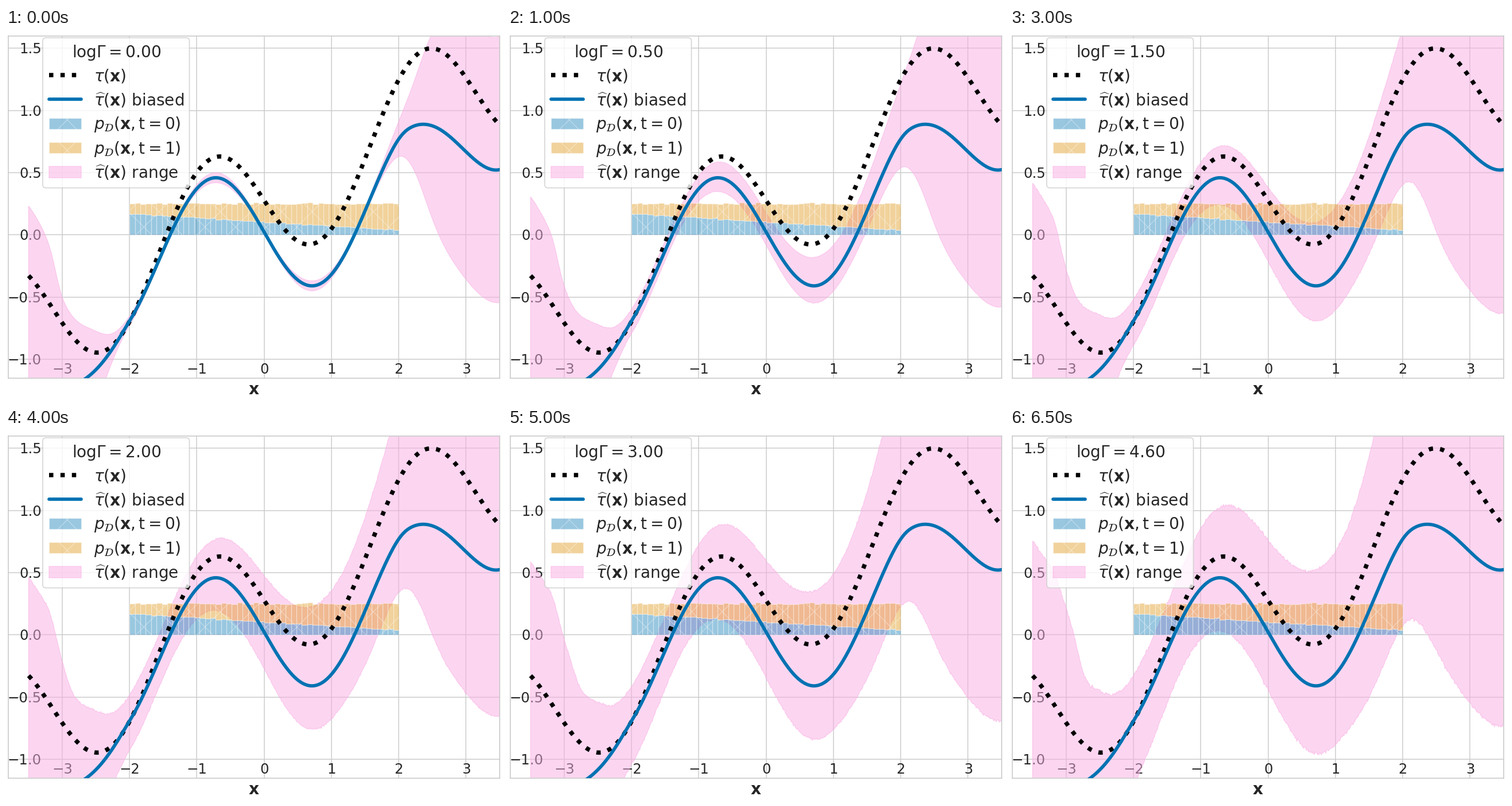
These frames come from a looping animation (864 by 648 pixels, 7000 ms). A matplotlib script:

```python
import numpy as np
import matplotlib.pyplot as plt
from matplotlib.animation import FuncAnimation
from matplotlib.patches import FancyBboxPatch, Polygon, Rectangle

W, H, DPI = 864, 648, 160
PX = 72 / DPI  # points per pixel
BLUE, SKY, ORANGE, PINK = "#0072b2", "#0173b2", "#de8f05", "#fbafe4"
INK, GRID = "0.15", "0.8"
LEVELS = [*np.arange(0, 2, 0.25), *np.arange(2, 4.5, 0.5), 4.6]

plt.rcParams.update({
    "font.family": "DejaVu Sans",
    "mathtext.fontset": "dejavusans",
    "text.color": INK,
    "hatch.linewidth": 1.1 * PX,
})

x = np.linspace(-3.5, 3.5, 700)


def step(center, width, sign=1):
    """Smooth rise from 0 to 1, to the right or (sign -1) to the left."""
    return 1 / (1 + np.exp(-sign * (x - center) / width))


def bump(center, width):
    return np.exp(-((x - center) / width) ** 2)


def ledge(center):
    return step(center, 0.04, -1) + bump(center - 0.15, 0.2)


# True effect, and the biased estimate that drifts off outside the data
tau = 0.2768 * (x + 1 - 2 * np.sin(2 * x))
out_left = np.maximum(-2 - x, 0)
out_right = np.logaddexp(0, 15 * (x - 2.05)) / 15
core = (tau - (0.255 + 0.118 * x - 0.006 * x ** 2)
        - 0.43 * out_right * (1 - out_right / 1.05))
est = core - 0.7 * out_left ** 1.7

# Band at level 0: tight where there is data, flaring outside
spread = 0.015 + 0.025 * np.sin(2.2 * x) ** 2 + 1.03 * step(2.36, 0.165)
top = core + spread + 0.07 * bump(-2.55, 0.25) + 0.29 * step(-3.1, 0.05, -1)
low = core - spread - 2 * out_left ** 2

# Widening up to level 2, then beyond it
up_a = (0.16 + 0.53 * step(-0.05, 0.5) + 0.45 * step(1.9, 0.22)
        + 0.07 * ledge(-2.92))
up_b = (0.155 + 0.135 * step(-1, 0.25) + 0.45 * step(1.55, 0.2)
        + 0.14 * ledge(-2.8))
down_a = (0.2 + 0.11 * step(-0.3, 0.3) + 0.11 * bump(1.55, 0.4)
          - 0.2 * step(2.15, 0.15))
down_b = (0.16 + 0.12 * step(-1.6, 0.2, -1) + 0.05 * step(0.5, 0.3)
          + 0.07 * bump(1.8, 0.5) - 0.13 * step(2.4, 0.1))


def band(level):
    a = min(level / 2, 1) ** 0.83
    b = max((level - 2) / 2.6, 0) ** 0.9
    rng = np.random.default_rng(int(level * 100))
    rough = rng.normal(0, 0.0024 * level ** 0.7, (2, x.size))
    upper = top + a * up_a + b * up_b + rough[0]
    lower = low - a * down_a - b * down_b + rough[1]
    return np.column_stack([np.r_[x, x[::-1]], np.r_[upper, lower[::-1]]])


fig = plt.figure(figsize=(W / DPI, H / DPI), dpi=DPI, facecolor="white")
ax = fig.add_axes([4.2 / W, 1 - 609.5 / H, 855.9 / W, 595.7 / H])
ax.set(xlim=(-3.8, 3.5), ylim=(-1.15, 1.6))
ax.set_xticks(range(-3, 4))
ax.set_yticks(np.arange(-1, 1.6, 0.5))
ax.set_axisbelow(True)
ax.grid(color=GRID, lw=1.5 * PX)
ax.tick_params(length=0, labelbottom=False, labelleft=False)
for spine in ax.spines.values():
    spine.set(color=GRID, linewidth=1.7 * PX)


def label(px, py, text, size=28, ha="left", z=12):
    """Text with its baseline at a pixel position, counted from the top left."""
    return ax.text(px, H - py, text, fontsize=size * PX, ha=ha, va="baseline",
                   transform=None, zorder=z)


def number(value, digits):
    return f"{value:.{digits}f}".replace("-", "\u2212")


for v in range(-3, 4):
    label(449.7 + 117.25 * v, 602.5, number(v, 0), 24.4, "center", 0.6)
for v in np.arange(-1, 1.6, 0.5):
    label(61.7, 369.2 - 216.6 * v, number(v, 1), 24.4, "right", 0.6)
label(432, 637.5, r"$\mathbf{x}$", ha="center")

# Range band, stacked densities and curves
area = ax.add_patch(Polygon(band(0), closed=True, facecolor=PINK, edgecolor=PINK,
                            alpha=0.5, lw=1.5 * PX, zorder=1))
rng = np.random.default_rng(4)
edges = np.linspace(-2, 2, 51)[:-1]
share = 0.105 - 0.033 * (edges + 0.04) + rng.normal(0, 0.0018, 50)
total = 0.252 + rng.normal(0, 0.004, 50)
hatched = dict(alpha=0.4, edgecolor="white", hatch="x", lw=1.2 * PX)
bars = dict(width=0.08, align="edge", zorder=2, **hatched)
ax.bar(edges, share, color=SKY, **bars)
ax.bar(edges, total - share, bottom=share, color=ORANGE, **bars)

dotted = dict(color="black", lw=7.5 * PX, ls=":", dash_capstyle="butt")
solid = dict(color=BLUE, lw=5.8 * PX, solid_capstyle="round")
ax.plot(x, tau, zorder=3, **dotted)
ax.plot(x, est, zorder=4, **solid)

# Legend
ax.add_patch(FancyBboxPatch((64, H - 278.5), 255.5, 261.5,
                            boxstyle="round,pad=0,rounding_size=5.6",
                            facecolor=(1, 1, 1, 0.8), edgecolor=(0.8, 0.8, 0.8, 0.8),
                            lw=1.7 * PX, transform=None, zorder=10))
title = label(192.5, 51, "", ha="center")
plain = dict(alpha=0.5, edgecolor=PINK, lw=1.5 * PX)
entries = (
    (r"$\tau(\mathbf{x})$", None, dotted),
    (r"$\widehat{\tau}(\mathbf{x})$ biased", None, solid),
    (r"$p_{\mathcal{D}}(\mathbf{x},\mathrm{t}=0)$", SKY, hatched),
    (r"$p_{\mathcal{D}}(\mathbf{x},\mathrm{t}=1)$", ORANGE, hatched),
    (r"$\widehat{\tau}(\mathbf{x})$ range", PINK, plain),
)
for row, (text, fill, style) in enumerate(entries):
    mid = 82 + 42.2 * row
    label(153.4, mid + 10, text)
    if fill:
        ax.add_patch(Rectangle((75, H - mid - 9.8), 56, 19.6, facecolor=fill,
                               transform=None, zorder=11, **style))
    else:
        ax.plot([75, 131], [H - mid] * 2, transform=None, zorder=11, **style)


def update(i):
    level = LEVELS[i]
    area.set_xy(band(level))
    title.set_text(rf"$\mathrm{{log}}\Gamma={level:.2f}$")
    return area, title


anim = FuncAnimation(fig, update, frames=len(LEVELS), interval=500,
                     init_func=lambda: update(0), repeat=True, repeat_delay=0)
plt.show()
```
